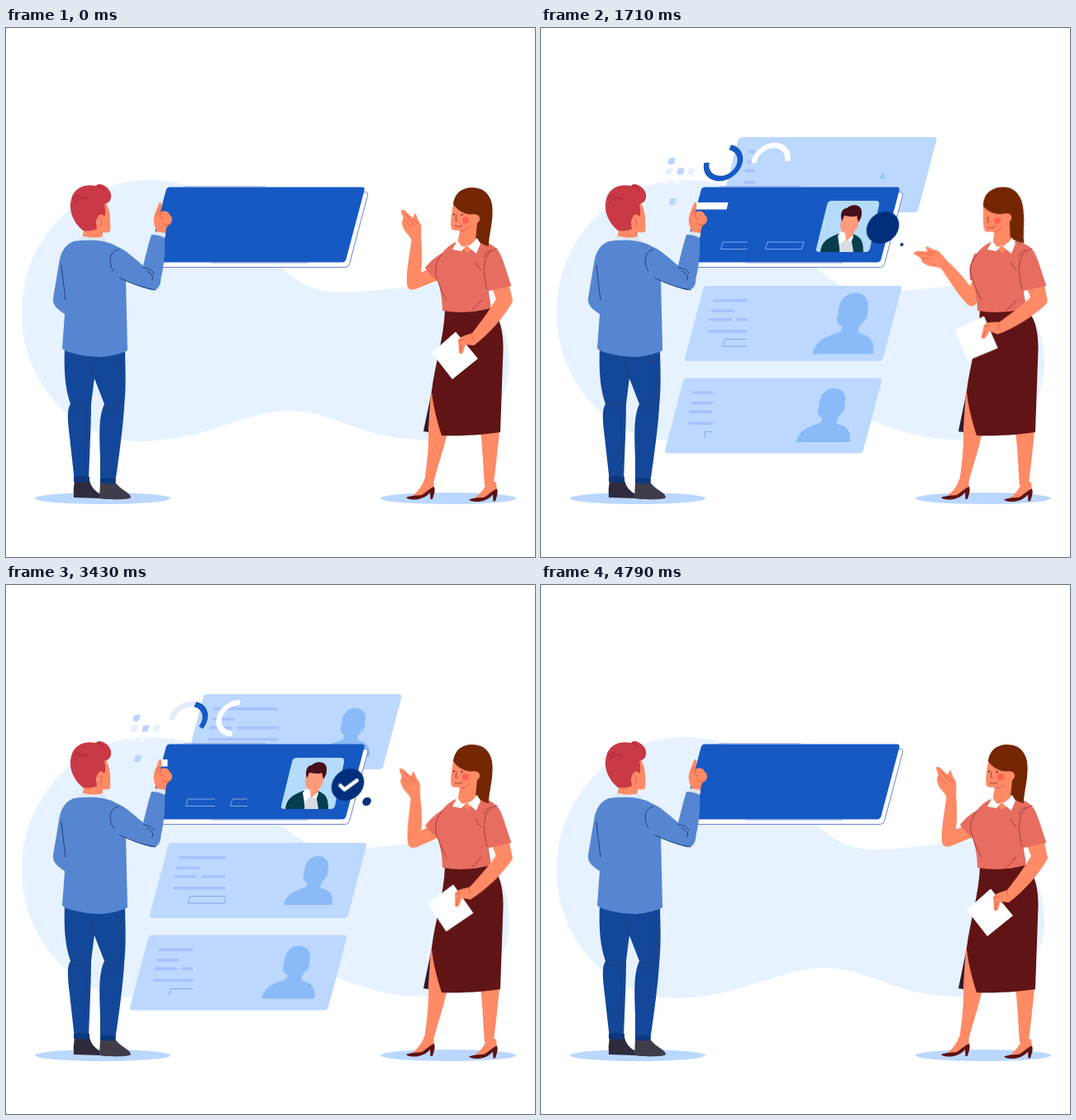
Recreate the animation shown at these times as an HTML page. Size 640 by 640 pixels, loop 4870 ms.

```html
<!DOCTYPE html>
<html lang="en">
<head>
<meta charset="utf-8">
<title>Choosing a profile</title>
<style>
html, body { margin: 0; width: 100%; height: 100%; overflow: hidden; background: #fff; }
svg { display: block; width: 100%; height: 100%; }

.a { animation: 4.87s linear infinite; }
.soft { animation-timing-function: cubic-bezier(.37, 0, .63, 1); }
.line { fill: none; stroke: #253f78; stroke-width: 1; stroke-linecap: round; }
.btn { fill: none; stroke: #7fa6ee; stroke-width: 1; }
.text { fill: #a7c1ff; }
.skin { fill: #ff8a66; }
.wool { fill: #5686d2; }
.blouse { fill: #e66d5f; }
.fold { stroke: #a33f40; }
.crease { stroke: #d9523f; stroke-width: .8; }
.arc { fill: none; stroke-width: 6.4; stroke-dasharray: 1.01 3; }

/* man */
#upper { animation-name: upper; transform-origin: 135px 275px; }
#fore { animation-name: fore; transform-origin: 181px 312px; }
#head { animation-name: head; transform-origin: 103px 252px; }
@keyframes upper { 0%, 2.9%, 35.2%, 100% { transform: none } 17.9% { transform: rotate(9deg) } }
@keyframes fore { 0%, 2.9%, 35.2%, 100% { transform: none } 17.9% { transform: rotate(12deg) } }
@keyframes head { 0%, 2.9%, 35.2%, 100% { transform: translate(0) rotate(0) } 17.9% { transform: translate(3px) rotate(4deg) } }

/* woman */
#wave { animation-name: wave; transform-origin: 532px 282px; }
#hold { animation-name: hold; transform-origin: 606px 330px; }
#nod { animation-name: nod; transform-origin: 557px 258px; }
#eyes { animation-name: blink; }
@keyframes wave { 0%, 2.5%, 73.9%, 100% { transform: rotate(0) } 40%, 49.8% { transform: rotate(-44deg) } }
@keyframes hold { 0%, 12.5%, 79.5%, 100% { transform: rotate(0) } 38.5%, 53.8% { transform: rotate(17deg) } }
@keyframes nod { 0%, 2.9%, 71%, 100% { transform: rotate(0) } 37%, 45% { transform: rotate(-8deg) } }
@keyframes blink { 0%, 33.5%, 37%, 100% { opacity: 1 } 33.6%, 36.9% { opacity: 0 } }

/* cards slide along their slant */
#c1 { animation-name: c1; } #c2 { animation-name: c2; } #c3 { animation-name: c3; }
@keyframes c1 {
  0%, 22% { transform: translate(-7px, 30px); opacity: 0 } 27% { opacity: 1 }
  29%, 93% { transform: none; opacity: 1 } 98.3%, 100% { transform: translate(-7px, 30px); opacity: 0 }
}
@keyframes c2 {
  0%, 13.2% { transform: translate(8px, -30px); opacity: 0 } 18.2% { opacity: 1 }
  19.9%, 87% { transform: none; opacity: 1 } 92%, 100% { transform: translate(8px, -30px); opacity: 0 }
}
@keyframes c3 {
  0%, 17.5% { transform: translate(8px, -30px); opacity: 0 } 23% { opacity: 1 }
  25%, 83.7% { transform: none; opacity: 1 }
  85.2% { opacity: .95 } 90.2%, 100% { transform: translate(8px, -30px); opacity: 0 }
}

/* wipes from the left */
.wipe { --shut: inset(-1px 101% -1px -1px); --open: inset(-1px); }
#title { animation-name: title; } #b1 { animation-name: b1; } #b2 { animation-name: b2; }
#t1 { animation-name: t1; } #t2 { animation-name: t2; } #t3 { animation-name: t3; }
@keyframes title { 0%, 2.9%, 78.4%, 100% { clip-path: var(--shut) } 34.4%, 44.6% { clip-path: var(--open) } }
@keyframes b1 { 0%, 9.4%, 88.8%, 100% { clip-path: var(--shut) } 47.700%, 64% { clip-path: var(--open) } }
@keyframes b2 { 0%, 2.9%, 87.7%, 100% { clip-path: var(--shut) } 34.4%, 47.9% { clip-path: var(--open) } }
@keyframes t1 { 0%, 33%, 85.4%, 100% { clip-path: var(--shut) } 51.4%, 62% { clip-path: var(--open) } }
@keyframes t2 { 0%, 28.4%, 80.1%, 100% { clip-path: var(--shut) } 46.2%, 61% { clip-path: var(--open) } }
@keyframes t3 { 0%, 30.2%, 77.6%, 100% { clip-path: var(--shut) } 50.7%, 59% { clip-path: var(--open) } }

/* arcs draw on, then erase from the same end */
#r1 { animation-name: r1; } #r2 { animation-name: r2; } #r3 { animation-name: r3; } #r4 { animation-name: r4; }
@keyframes r1 { 0%, 10.2% { stroke-dashoffset: 1.02 } 34.6%, 57% { stroke-dashoffset: 0 } 80.5%, 100% { stroke-dashoffset: -1.02 } }
@keyframes r2 { 0%, 34.6% { stroke-dashoffset: 1.02 } 42%, 80.5% { stroke-dashoffset: 0 } 88.5%, 100% { stroke-dashoffset: -1.02 } }
@keyframes r3 { 0%, 17.5% { stroke-dashoffset: 1.02 } 43%, 62.5% { stroke-dashoffset: 0 } 87.500%, 100% { stroke-dashoffset: -1.02 } }
@keyframes r4 { 0%, 5.5% { stroke-dashoffset: 1.02 } 17.5%, 55% { stroke-dashoffset: 0 } 63%, 100% { stroke-dashoffset: -1.02 } }
#tick { animation-name: tick; stroke-dasharray: 1.01 3; }
@keyframes tick { 0%, 38% { stroke-dashoffset: 1.02; opacity: 0 } 38.1% { opacity: 1 } 44%, 100% { stroke-dashoffset: 0; opacity: 1 } }

/* pops with overshoot */
#photo { animation-name: photo; } #badge { animation-name: badge; } #dot { animation-name: dot; }
#p1 { animation-name: p1; } #p2 { animation-name: p2; } #p3 { animation-name: p3; }
#grid use { animation-name: grid; }
@keyframes photo {
  0%, 16.1% { transform: scale(0) } 24% { transform: scale(1.12) }
  28%, 81% { transform: none } 85% { transform: scale(1.13) } 92%, 100% { transform: scale(0) }
}
@keyframes grid {
  0%, 27% { transform: scale(0) } 32% { transform: scale(1.35) }
  35%, 81% { transform: none } 85% { transform: scale(1.4) } 90%, 100% { transform: scale(0) }
}
@keyframes badge {
  0%, 28% { transform: scale(0) } 33% { transform: scale(1.1) }
  35%, 74% { transform: none } 78% { transform: scale(1.12) } 84%, 100% { transform: scale(0) }
}
@keyframes dot {
  0%, 33.9% { transform: scale(0) } 37.5% { transform: scale(1.15) }
  41%, 85% { transform: none } 90%, 100% { transform: scale(0) }
}
@keyframes p1 {
  0%, 34.700% { transform: scale(0) } 40% { transform: scale(1.25) }
  45%, 76% { transform: none } 79% { transform: scale(1.2) } 86.7%, 100% { transform: scale(0) }
}
@keyframes p2 {
  0%, 29.5% { transform: scale(0) } 35.1% { transform: scale(1.25) }
  40%, 71.500% { transform: none } 76% { transform: scale(1.2) } 85.2%, 100% { transform: scale(0) }
}
@keyframes p3 {
  0%, 31% { transform: scale(0); animation-timing-function: ease-out } 36.4% { transform: scale(1.2) }
  41%, 69% { transform: none } 71.6% { transform: scale(1.15) } 79%, 100% { transform: scale(0) }
}
</style>
</head>
<body>
<svg viewBox="0 0 640 640">
  <defs>
    <path id="card" d="M27 0H259Q263 0 262 4L240 87Q239 91 235 91H3Q-1 91 0 87L22 4Q23 0 27 0Z"/>
    <path id="bust" fill="#8abaf7" d="M-30 29C-27 16-18 13-10 10C-3 8-1 7-2 2C-6 1-8-6-5-10C-5-22 2-30 11-30C22-30 26-22 23-12C24-7 21-3 18-1C14 4 14 7 15 9C24 11 30 14 29 29Z"/>
    <path id="btn" d="M2.500 0H46.500L44 8.500H0Z"/>
    <path id="cell" d="M-1.500-4H3Q5-4 4.500-2L3 2Q2.500 4 1 4H-3Q-5 4-4.500 2L-3.500-2Q-3-4-1.500-4Z"/>
    <g id="lines">
      <rect x="6" width="85" height="3.600" rx="1.800"/><rect x="100" width="27" height="3.600" rx="1.800"/>
      <rect x="4" y="12.500" width="28" height="3.600" rx="1.800"/>
      <rect x="1" y="23" width="28" height="3.600" rx="1.800"/><rect x="34" y="23" width="85" height="3.600" rx="1.800"/>
      <rect y="37" width="85" height="3.600" rx="1.800"/>
    </g>
    <g id="foot">
      <path class="skin" d="M506 546L517 547L518 557L500 567L488 569C496 563 503 556 506 546Z"/>
      <path fill="#5c1315" d="M484 568C492 565 498 566 503 565C509 561 514 556 518 555C520 560 517 566 516 570H513.500L513 562C508 568 500 571 492 570.500Q486 570 484 568Z"/>
    </g>
  </defs>

  <path fill="#e6f2ff" d="M172 184C95 184 19 250 19 345C19 430 85 500 162 500C240 500 290 463 343 463C395 463 430 498 505 498C560 498 609 470 609 405C609 350 575 304 515 310C470 315 430 320 402 320C360 320 337 294 322 278C285 225 250 184 172 184Z"/>
  <g fill="#bad7ff"><ellipse cx="117" cy="569" rx="82" ry="7"/><ellipse cx="535" cy="569" rx="82" ry="7"/></g>

  <g id="c3" class="a">
    <use href="#card" x="150" y="423.500" fill="#bdd8ff"/>
    <g id="t3" class="a wipe">
      <use href="#lines" class="text" x="178" y="439.500"/>
      <path class="btn" d="M197 496L199 488.500H243L241 496M250 496L252 488.500H297L295 496"/>
    </g>
    <g transform="translate(342 469)"><g id="p3" class="a"><use href="#bust"/></g></g>
  </g>
  <g id="c2" class="a">
    <use href="#card" x="174" y="312" fill="#bdd8ff"/>
    <g id="t2" class="a wipe">
      <use href="#lines" class="text" x="202" y="328"/>
      <use href="#btn" class="btn" x="220" y="376.500"/><use href="#btn" class="btn" x="274" y="376.500"/>
    </g>
    <g transform="translate(366 358)"><g id="p2" class="a"><use href="#bust"/></g></g>
  </g>
  <g id="c1" class="a">
    <use href="#card" x="216.500" y="132" fill="#bdd8ff"/>
    <g id="t1" class="a wipe">
      <use href="#lines" class="text" x="244.500" y="148"/><rect class="text" x="350" y="148" width="27" height="3.600" rx="1.800"/>
    </g>
    <g transform="translate(413 179)"><g id="p1" class="a"><use href="#bust" transform="translate(-2)"/></g></g>
  </g>

  <use href="#card" x="175.500" y="198.500" fill="#fff" stroke="#6584d3"/>
  <use href="#card" x="171.500" y="192.500" fill="#1659c3"/>
  <path class="line" style="stroke:#8095da" d="M216 192H314M248 284H365"/>

  <path id="title" class="a wipe" fill="#fff" d="M188 211H226.500L224.500 219.500H186Z"/>
  <g id="b1" class="a wipe"><use href="#btn" class="btn" x="217.500" y="259"/></g>
  <g id="b2" class="a wipe"><use href="#btn" class="btn" x="271.500" y="259"/></g>

  <g transform="translate(220.500 163) skewX(-13)">
    <path id="r2" class="a arc" pathLength="1" stroke="#e4e9fb" d="M4-18.600A20 19 0 0 0-20 0"/>
    <path id="r1" class="a arc" pathLength="1" stroke="#1659c3" d="M-20 0A20 19 0 1 0 4-18.600"/>
  </g>
  <g transform="translate(278 161) skewX(-13)">
    <path id="r4" class="a arc" pathLength="1" stroke="#bdd8ff" d="M0 19A20 19 0 0 0 20 0"/>
    <path id="r3" class="a arc" pathLength="1" stroke="#fff" d="M20 0A20 19 0 1 0 0 19"/>
  </g>

  <g id="grid">
    <g fill="#b9d6ff">
      <g transform="translate(158 161)"><use class="a" href="#cell"/></g>
      <g transform="translate(169 173.500)"><use class="a" href="#cell"/></g>
      <g transform="translate(159.500 210)"><use class="a" href="#cell"/></g>
    </g>
    <g fill="#e6f1ff">
      <g transform="translate(155 173.500)"><use class="a" href="#cell"/></g>
      <g transform="translate(182 173.500)"><use class="a" href="#cell"/></g>
    </g>
    <g fill="#f7fbff">
      <g transform="translate(152 185.500)"><use class="a" href="#cell"/></g>
      <g transform="translate(165.500 185.500)"><use class="a" href="#cell"/></g>
    </g>
  </g>

  <g transform="translate(371 240)"><g id="photo" class="a">
    <path fill="#b5dbfc" d="M-19-31H34Q39-31 38-26L27 27Q26 31 22 31H-34Q-39 31-38 27L-25-26Q-24-31-19-31Z"/>
    <path fill="#063e50" d="M-33 31C-31 16-22 14-12 9L6 9C16 13 19 17 19 31Z"/>
    <path fill="#fff" d="M-12 11L-8 7L5 7L7 12L0 31H-9Z"/>
    <path fill="#d9dde3" d="M-9 21L-2 16L5 19L7 31H-10Z"/>
    <path fill="#ff9a7c" d="M-5-14C-8-8-10-1-8 4C-6 8-3 8-3 8L-2 18L7 10L8 6C13 2 14-6 13-13L2-18Z"/>
    <path fill="#46101c" d="M-7-6C-10-16-6-22-1-22C5-28 18-27 17-16C17-11 15-8 13-5L11-13C6-10 0-13-4-13Z"/>
  </g></g>
  <g transform="translate(413.500 241.500)"><g id="badge" class="a">
    <circle r="19.500" fill="#022f7c" transform="skewX(-10)"/>
    <path id="tick" class="a" pathLength="1" fill="none" stroke="#fff" stroke-width="4.500" stroke-linejoin="round" stroke-linecap="round" d="M-9 1L-4 6L11-5"/>
  </g></g>
  <g transform="translate(436.500 262)"><g id="dot" class="a"><circle r="5.200" fill="#022f7c" transform="skewX(-10)"/></g></g>

  <!-- man -->
  <path fill="#2f2b3c" d="M83 547H101C103 556 108 560 114 564L113 569L82 568Q81 558 83 547Z"/>
  <path fill="#413c4a" d="M114 549H132C137 558 151 562 151 568C151 571 120 571 113 569Z"/>
  <path fill="#13479a" d="M71 386C70 412 71 435 78 455C73 462 75 478 77 495L83 549H100C101 520 103 480 103 455C105 440 106 430 107 424L119 455C112 470 113 490 114 520V551H132C136 525 142 480 143 458C146 430 144 405 144 388Z"/>
  <path fill="#0d377e" d="M82 543Q92 541 101 543V549Q92 550 82 549ZM114 545Q123 543 133 546L132 551Q123 552 114 550Z"/>
  <path class="line" d="M101 403Q104 414 107 424M78 456Q90 452 102 457M80 460Q88 458 96 460M119 458Q130 456 142 461M121 463Q128 462 134 466M98 462Q97 500 96 542M138 402Q141 430 139 457M131 403Q138 404 143 399"/>
  <g id="head" class="a soft">
    <path class="skin" d="M118 206C123 214 126 222 126 232C126 240 128 247 123 247.500L117 247L117 260L91 260L95 240L110 236Z"/>
    <path fill="#c93a46" d="M93 245C82 236 75 222 79 207C82 193 96 188 109 191C113 185 129 194 127 205C126 211 122 212 119 213C121 222 121 229 117 228C110 225 108 235 110 243C104 246 98 246 93 245Z"/>
    <ellipse class="skin" cx="115" cy="234" rx="5" ry="8.500"/>
    <path class="line" style="stroke:#9f2437" d="M82 212Q86 204 98 206M81 207Q85 202 89 203M110 191Q116 192 119 197"/>
    <path class="line crease" d="M113 231Q117 231 115 239"/>
  </g>
  <path fill="#dce7f1" d="M84 260Q88 251 95 252Q106 255 117 252Q123 256 123 262Z"/>
  <path class="wool" d="M82 258C72 262 66 270 64 285L57 327C56 337 65 342 71 346L68 388C75 394 100 398 115 398C130 397 142 393 147 390L145 305C150 292 142 272 132 263C118 256 100 256 82 258Z"/>
  <g id="upper" class="a soft">
    <path class="wool" d="M131 263C146 268 157 281 168 289L186 296C190 310 184 318 176 317C163 314 150 308 140 303C128 298 122 278 131 263Z"/>
    <g id="fore" class="a soft">
      <path class="skin" d="M181 251L182 244C178 238 178 231 180 225L185 212C187 209 189 213 188 216L187 223C192 220 197 222 198 226C203 229 201 237 197 238C194 240 193 245 193 252Z"/>
      <path class="line crease" d="M182 226Q185 220 187 219M187 223Q184 230 190 231M197 238Q191 239 189 236"/>
      <path fill="#dce7f1" d="M180 246L193 248L192 255L178 253Z"/>
      <path class="wool" d="M176 250Q185 250 192 254C193 275 190 295 186 308C184 318 176 319 172 315L163 300C168 280 171 265 176 250Z"/>
      <path class="line" d="M166 290Q177 291 179 297M170 294Q180 298 177 305"/>
    </g>
    <path class="line" d="M137 302Q158 313 181 317"/>
  </g>
  <path class="line" d="M136 268C124 270 124 286 130 294M67 287Q69 305 72 329"/>

  <!-- woman -->
  <path fill="#2f1a2c" d="M517 430L505 488L511 489L518 446Z"/>
  <path class="skin" d="M514 440L511 485C512 510 508 535 506 550L517 551C522 530 530 510 534 488L520 440ZM574 488H597C595 510 592 535 590 552L579 553C577 530 577 510 574 488Z"/>
  <use href="#foot"/><use href="#foot" x="76" y="2.500"/>
  <path fill="#601415" d="M531 341C530 375 518 410 515 440C517 460 523 480 527 493C550 494 580 492 598 489L601.500 390C602 368 598 350 586 338Z"/>
  <g id="wave" class="a soft">
    <path class="skin" d="M491 254C488 275 484 295 485 310C486 319 494 317 500 314L528 303L514 290L502 296C504 280 503 265 502 252Z"/>
    <path class="skin" d="M491 258C489 250 482 248 480 240C478 236 479 232 481 231L478 222C478 219 482 220 484 222L492 230L494 225C496 223 497 228 498 231L502 238C503 244 502 250 502 258Z"/>
    <path class="line crease" d="M481 231L490 240M484 225L494 238M492 230L498 237"/>
    <path class="blouse" d="M533 270C523 274 514 281 507 290Q514 301 524 307L542 290Z"/>
  </g>
  <path class="skin" d="M588 315L609 312L613 330L602 340L593 328Z"/>
  <path class="skin" d="M550 240H570L572 262L557 275L546 262Z"/>
  <path class="blouse" d="M544 259C536 263 530 268 526 275C517 287 517 293 521 302C527 320 528 333 528 342Q558 347 586 339C588 335 584 325 584 318L611.500 312C606 297 602 280 596 270C590 262 582 259 574 258L558 272Z"/>
  <path class="line fold" d="M528 273C516 288 519 298 524 310Q527 320 533 329M568 283Q571 290 575 293M594 267C580 270 574 285 582 316M575 329Q570 336 564 341M578 277Q580 271 586 269"/>
  <g id="nod" class="a soft">
    <path fill="#732600" d="M560 205L580 200C588 206 589 215 588.500 226C588 240 584 252 584 264Q574 262 568 254Z"/>
    <path class="skin" d="M542 208C539 225 537 238 539 243C542 246 547 244 550 246L549 257Q558 260 568 257L570 236C576 232 574 224 568 226L560 205Z"/>
    <path fill="#732600" d="M541 213C543 199 552 193 564 193C580 193 589 204 588 222L583 240L570 238C575 233 574 226 568 225C556 227 546 221 541 213Z"/>
    <circle cx="556" cy="232.500" r="4" fill="#ff6152"/>
    <g id="eyes" class="a" fill="#4b1d16"><circle cx="542" cy="225.500" r="1"/><circle cx="551.500" cy="226" r="1"/></g>
    <path class="line fold" d="M545 226L544 233H546M543 239Q548 242 552 239"/>
    <path class="line crease" d="M550 246Q556 246 561 240"/>
  </g>
  <path fill="#fff" d="M546 257L540 268L551 270L557 263L569 273L574 261L570 254Q560 267 551 264Z"/>
  <g id="hold" class="a soft">
    <path fill="#fff" d="M544 367.500L571 400L540 425L515 393Z"/>
    <path class="skin" d="M594 326C586 340 575 355 564 369C556 372 549 373 547 378L548 393Q551 396 553 392L556 383L566 384C585 370 602 350 613 331L606 322Z"/>
    <path class="line crease" d="M548 379L554 377M564 369Q562 373 566 377M551 383L550 392"/>
  </g>
</svg>
</body>
</html>
```
